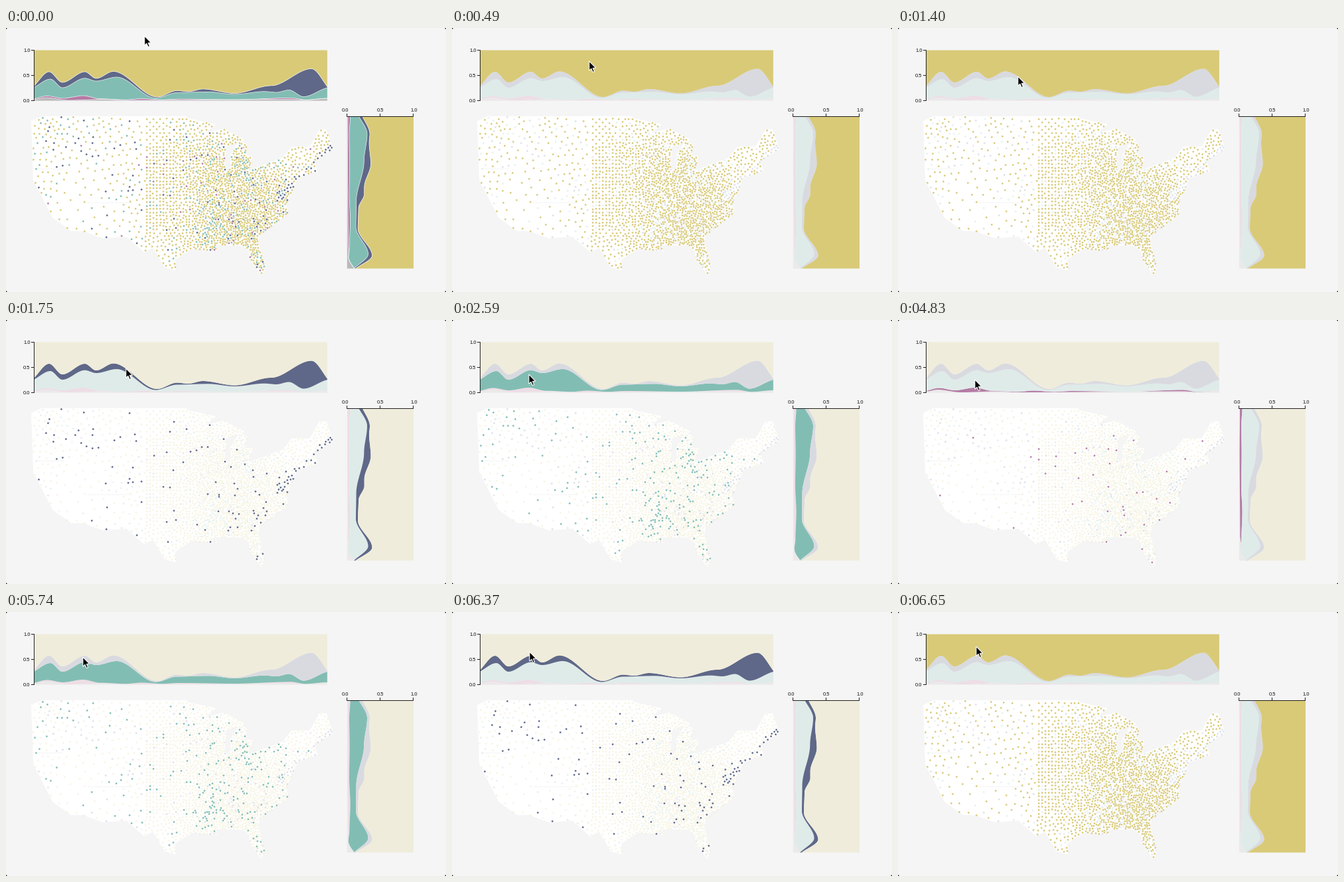
A matplotlib script for the animation above (7070 ms loop, 664 by 398 pixels).

```python
import numpy as np
import matplotlib.pyplot as plt
from matplotlib.animation import FuncAnimation
from matplotlib.patches import FancyBboxPatch
from matplotlib.path import Path

W, H, DPI = 664, 398, 100
PX = 72 / DPI
STEP, FRAMES = 70, 101
rng = np.random.default_rng(7)

KINDS = ["gray", "pink", "teal", "navy", "yellow"]
FULL = dict(gray="#b9b9b9", pink="#b57ba5", teal="#82bdb3",
            navy="#5f6888", yellow="#d9ca78")
DIM = dict(gray="#ebe9ea", pink="#eddde5", teal="#dfebe9",
           navy="#d9dae0", yellow="#efecdb")

# Peaks and valleys of each band's edge; the curve eases between them.
TOP = dict(
    gray=[(43, 107.5), (60, 105), (95, 109), (150, 107.5), (180, 109),
          (430, 107.5), (452, 108.6), (485, 106)],
    pink=[(35, 108), (62, 102.5), (86, 106), (116, 102), (142, 106.7),
          (180, 108.2), (205, 106.5), (235, 108.2), (262, 107), (345, 108),
          (430, 105.3), (452, 108.3), (485, 106)],
    teal=[(34, 92), (67, 77), (85, 90), (119, 75.7), (136, 80), (167, 74),
          (226, 105.5), (258, 97.5), (305, 96.3), (345, 100), (390, 95.7),
          (408, 97), (427, 93.5), (449, 103.5), (490, 89.5)],
    navy=[(34, 92), (65, 66), (85, 82), (119, 66), (136, 76), (162, 65.5),
          (228, 104), (258, 94.5), (275, 96), (297, 92), (345, 98.5),
          (400, 87), (461, 61.5), (496, 97)],
    yellow=[(43, 33.5), (485, 33.5)])
SIDE = dict(
    gray=[(134, 516), (200, 515.6), (325, 516.3), (337, 517.6), (345, 516.8),
          (380, 535)],
    pink=[(134, 519.5), (160, 518), (200, 518.6), (250, 518), (290, 519.6),
          (330, 518.3), (345, 516.8), (380, 535)],
    teal=[(120, 528), (160, 545), (200, 540.3), (262, 528.5), (300, 528),
          (341, 546.5), (370, 521)],
    navy=[(122, 535), (160, 549), (172, 548), (205, 550.5), (240, 540.7),
          (250, 540.7), (272, 532), (302, 531), (343, 552.5), (370, 522)],
    yellow=[(134, 615), (362.5, 615)])

# Key points of the country outline, longitude and latitude.
COAST = [
    (-124.7, 48.4), (-122.8, 49), (-95.2, 49), (-94.6, 48.7), (-89.6, 48),
    (-92, 46.7), (-87.9, 47.4), (-84.1, 46), (-87.5, 45.2), (-87.8, 42.3),
    (-87.2, 41.6), (-86.3, 42.3), (-86.5, 43.8), (-84.8, 45.8), (-83.5, 45.3),
    (-83.9, 43.7), (-82.5, 43.7), (-83.2, 41.6), (-78.9, 42.8), (-76.4, 43.5),
    (-74.8, 45), (-71.3, 45), (-69.4, 47.3), (-68.2, 47.3), (-67, 44.8),
    (-70.6, 43.2), (-70, 41.7), (-73.8, 40.7), (-76, 36.8), (-75.6, 35.3),
    (-81, 31.9), (-81.4, 30.5), (-80.1, 26.6), (-80.6, 25.1), (-82.8, 27.9),
    (-82.8, 29.1), (-84.2, 30.1), (-89.5, 30.2), (-89.3, 29.2), (-94, 29.6),
    (-97.3, 27.7), (-97.2, 25.9), (-99.1, 26.4), (-101.4, 29.8), (-103.1, 29),
    (-106.5, 31.6), (-111, 31.3), (-114.8, 32.5), (-117.1, 32.5),
    (-120.6, 34.6), (-124.3, 40.3)]

# Times in ms.
SWITCHES = [(0, None), (280, "yellow"), (1750, "navy"), (2450, "teal"),
            (3780, "pink"), (5040, "teal"), (5950, "navy"), (6440, "yellow")]
MOVES = [(0, 490, (209, 12), (207, 50)), (1050, 1400, (207, 50), (181, 73)),
         (1890, 2520, (181, 73), (116, 82)), (2870, 3500, (116, 82), (116, 102)),
         (4480, 4830, (116, 102), (116, 90)), (5180, 5740, (116, 90), (116, 68)),
         (6090, 6650, (116, 68), (118, 52))]
ARROW = np.array([(0, 0), (0, 14.3), (3.2, 11.3), (5.5, 16.6), (7.8, 15.6),
                  (5.6, 10.4), (10, 10.2)])


def ease(u):
    return u * u * (3 - 2 * u)


def wave(knots, x):
    kx, ky = np.array(knots, float).T
    i = np.clip(np.searchsorted(kx, x) - 1, 0, len(kx) - 2)
    return ky[i] + (ky[i + 1] - ky[i]) * ease((x - kx[i]) / (kx[i + 1] - kx[i]))


def project(lon, lat):
    mercator = np.arcsinh(np.tan(np.radians(lat)))
    return 39 + (lon + 124.7) * 7.86, 133.5 + 447 * (0.9846 - mercator)


def bump(x, y, cx, cy, spread):
    return np.exp(-((x - cx) ** 2 + (y - cy) ** 2) / (2 * spread ** 2))


def spacing(x, y):
    """Distance between dots: wide in the west, tight in the southeast."""
    east = 4.7 - 1.8 * np.clip((x - 212) / 100, 0, 1)
    east += 1.6 * np.clip((195 - y) / 50, 0, 1) - 0.5 * bump(x, y, 358, 300, 18)
    east += 2 * bump(x, y, 440, 190, 28) + 1.5 * bump(x, y, 235, 340, 20)
    west = 8 + 6 * bump(x, y, 115, 270, 40)
    west -= 2.5 * (bump(x, y, 60, 145, 20) + bump(x, y, 185, 245, 18)
                   + bump(x, y, 60, 245, 18))
    return np.where(x < 209, west, east)


def choose_kinds(x, y):
    """Pick each dot's kind from where it lies."""
    west = x < 209
    corridor = np.exp(-((x + y - 668) / 8) ** 2) * (x > 408) * (y < 270)
    navy = np.where(west, 0.14, 0.025) + 0.75 * corridor
    navy += 0.25 * (bump(x, y, 382, 286, 7) + bump(x, y, 300, 326, 5))
    teal = np.where(west, 0.2, 0.06)
    for cx, cy, spread in ((310, 290, 18), (380, 200, 24), (270, 165, 16),
                           (378, 350, 10), (243, 340, 12)):
        teal = teal + 0.3 * bump(x, y, cx, cy, spread)
    pick = rng.random(len(x))
    return np.select([pick < 0.02, pick < 0.02 + navy, pick < 0.02 + navy + teal],
                     ["pink", "navy", "teal"], "yellow")


def scatter_dots(land):
    """A grid on the plains that loosens eastward, then random darts."""
    gx, gy = np.meshgrid(np.arange(212, 322, 5), np.arange(137, 312, 5.2))
    grid = np.column_stack([gx.ravel(), gy.ravel()])
    grid += rng.normal(0, 1, grid.shape) * (0.2 + (grid[:, :1] - 211) * 0.012)
    tries = np.vstack([grid, rng.uniform((40, 134), (493, 372), (70000, 2))])
    tries = tries[land.contains_points(tries)]
    gaps = spacing(*tries.T)
    spots, n = np.zeros((5000, 2)), 0
    for p, gap in zip(tries, gaps):
        d = spots[:n] - p
        if n == 0 or np.einsum("ij,ij->i", d, d).min() > gap * gap:
            spots[n] = p
            n += 1
    return spots[:n]


fig = plt.figure(figsize=(W / DPI, H / DPI), dpi=DPI, facecolor="black")
ax = fig.add_axes([0, 0, 1, 1])
ax.set_xlim(0, W)
ax.set_ylim(H, 0)
ax.axis("off")
ax.add_patch(FancyBboxPatch((0, 0), W, H, fc="#f5f5f5", ec="none",
                            boxstyle="round,pad=0,rounding_size=3", zorder=0))

outline = np.column_stack(project(*np.array(COAST).T))
ax.fill(*outline.T, fc="white", ec="white", lw=2 * PX, joinstyle="round")
for x0, x1, y in ((45, 85, 212), (123, 190, 263)):
    ax.plot([x0, x1], [y, y], color="#f0f0f0", lw=0.7 * PX)

spots = scatter_dots(Path(outline))
kinds = choose_kinds(*spots.T)
dots = {k: ax.scatter(*spots[kinds == k].T, s=(3 * PX) ** 2, c=FULL[k],
                      edgecolors="white", linewidths=0.25 * PX, snap=False)
        for k in ("yellow", "teal", "navy", "pink")}

bands, seams = {}, []
xs, ys = np.linspace(42.7, 484.8, 400), np.linspace(133.8, 362.6, 300)
top_base, side_base = np.full(400, 109.6), np.full(300, 514.8)
for k in KINDS:
    top, side = wave(TOP[k], xs), wave(SIDE[k], ys)
    style = dict(fc=FULL[k], ec="none", lw=0, snap=False)
    bands[k] = [ax.fill_between(xs, top_base, top, **style),
                ax.fill_betweenx(ys, side_base, side, **style)]
    if k != "yellow":
        for line in ((xs, top), (side, ys)):
            seams += ax.plot(*line, color="white", lw=0.7 * PX, alpha=0.8)
    top_base, side_base = top, side


def rule(x, y):
    ax.plot(x, y, color="#222222", lw=PX, solid_capstyle="butt", snap=False)


def label(x, y, text, ha):
    ax.text(x, y, text, ha=ha, va="center_baseline", color="#111111",
            family="Liberation Sans", size=7.6 * PX)


rule([42.5, 42.5], [33, 110])
rule([514, 615], [133.5, 133.5])
for i, (text, lx) in enumerate((("0.0", 512), ("0.5", 565), ("1.0", 616))):
    y, x = 109.5 - 38 * i, 514.5 + 50 * i
    rule([38, 42.5], [y, y])
    rule([x, x], [129, 133.5])
    label(36.5, y, text, "right")
    label(lx, 124, text, "center")

cursor, = ax.fill(*ARROW.T, fc="black", ec="white", lw=1.1 * PX, zorder=10)


def cursor_at(t):
    pos = np.array(MOVES[0][2], float)
    for start, end, a, b in MOVES:
        if t >= start:
            u = ease(min((t - start) / (end - start), 1))
            pos = np.array(a) * (1 - u) + np.array(b) * u
    return pos


def draw(i):
    t = i * STEP
    active = [kind for start, kind in SWITCHES if t >= start][-1]
    for k in KINDS:
        lit = active in (None, k)
        for band in bands[k]:
            band.set_facecolor(FULL[k] if lit else DIM[k])
        if k in dots:
            dots[k].set_alpha(1 if lit else 0.17)
            dots[k].set_zorder(3 if active == k else 2)
    for seam in seams:
        seam.set_visible(active is None)
    cursor.set_xy(ARROW + cursor_at(t))
    return []


anim = FuncAnimation(fig, draw, frames=FRAMES, interval=STEP, repeat=True,
                     repeat_delay=0, blit=False)
plt.show()
```
